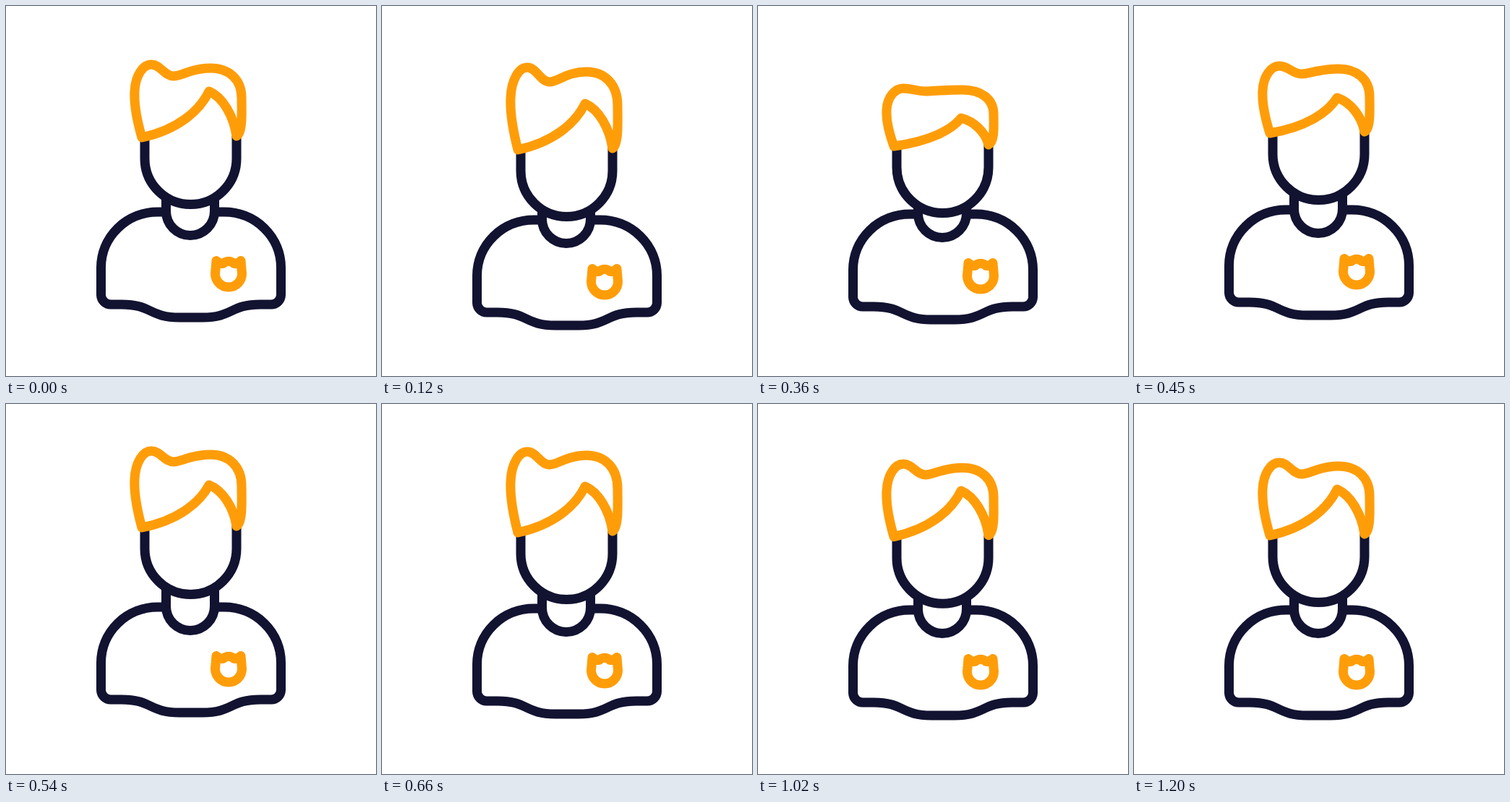
These frames come from a looping animation (512 by 512 pixels, 3800 ms). An HTML page:

```html
<!DOCTYPE html>
<html>
<head>
<meta charset="utf-8">
<style>
  html, body { margin: 0; height: 100%; overflow: hidden; background: #fff; }
  svg { display: block; width: 100vw; height: 100vh; }
  path { fill: none; stroke: #121331; stroke-width: 13; stroke-linejoin: round; }
  .accent { stroke: #ff9d09; stroke-linecap: round; }
</style>
</head>
<body>
<svg viewBox="0 0 512 512">
  <path id="head"/>
  <path id="neck"/>
  <g id="torso">
    <path d="M221 285H210A78.5 77 0 0 0 131.5 362V400A13.5 13.5 0 0 0 145 413H160C202 413 198 431 240 431H272C314 431 310 413 352 413H367A13.5 13.5 0 0 0 380.5 400V362A78.5 77 0 0 0 302 285H289"/>
    <path class="accent" d="M291 352.5Q299 359 303 354.5Q308 352 313 354.5Q317 359 325 352.5L326.5 370.5A18.5 18.5 0 0 1 289.5 370.5Z"/>
  </g>
  <path id="hair" class="accent"/>
</svg>
<script>
const LOOP = 3800, STEP = 30, END = 1200;

// time, then vertical offsets: body, head, hair top, notch, right crown, fringe peak
const keys = [
  [0, 0, 0, 0, 0, 0, 0],
  [120, 11, 17, 4, 8, 5, 17],
  [210, 18, 34, 23, 26, 22, 35],
  [240, 19, 35, 31, 30, 29, 40],
  [300, 12, 26, 41, 32, 38, 45],
  [360, 3, 12, 33, 21, 30, 37],
  [450, -3, -6, 2, -3, 1, 9],
  [540, -4, -11, -16, -17, -16, -6],
  [600, -3.4, -9, -20, -18, -19, -8],
  [660, -2, -4, -15, -13, -15, -4],
  [750, -.5, 2, -4, -4, -4, 2],
  [840, 0, 5, 7, 3, 6, 7],
  [960, 0, 3, 4, 2, 4, 4],
  [1080, 0, .5, .5, 0, .5, .5],
  [END, 0, 0, 0, 0, 0, 0]
];

const el = id => document.getElementById(id);
const draw = (id, d) => el(id).setAttribute('d', d);

function slope(i, c) {
  const a = keys[i - 1], b = keys[i + 1];
  return a && b ? (b[c] - a[c]) / (b[0] - a[0]) : 0;
}

// Cubic Hermite through the keys
function sample(t) {
  let i = 0;
  while (i < keys.length - 2 && t >= keys[i + 1][0]) i++;
  const a = keys[i], b = keys[i + 1], span = b[0] - a[0];
  const u = (t - a[0]) / span, v = 1 - u;
  return a.slice(1).map((_, n) => {
    const c = n + 1;
    return v * v * (1 + 2 * u) * a[c] + u * u * (3 - 2 * u) * b[c]
      + span * u * v * (v * slope(i, c) - u * slope(i + 1, c));
  });
}

function render(t) {
  const [body, head, dTop, dNotch, dCrown, dPeak] = sample(t);
  const left = 182 + head, right = 180 + head;
  const top = 81 + dTop, notch = 97 + dNotch, crown = 86 + dCrown, peak = 118 + dPeak;
  const mix = (from, to, k) => from + (to - from) * k;

  el('torso').setAttribute('transform', `translate(0 ${body})`);
  draw('head', `M192 ${left}V${211 + head}A63.5 63.5 0 0 0 319 ${211 + head}V${right}`);
  draw('neck', `M221.5 ${265 + head}V${284 + body}A33.5 33.5 0 0 0 288.5 ${284 + body}V${265 + head}`);
  draw('hair', `M188 ${left}
    C181 ${mix(left, top, .24)} 177 ${mix(left, top, .44)} 178 ${mix(left, top, .63)}
    C179 ${mix(left, top, .86)} 190 ${top} 201 ${top}
    C214 ${top} 219 ${notch} 232 ${notch}
    C243 ${notch} 256 ${crown} 283 ${crown}
    C308 ${crown} 326 ${mix(right, crown, .84)} 326 ${mix(right, crown, .56)}
    C326 ${mix(right, crown, .37)} 328 ${mix(right, crown, .05)} 319 ${right}
    C315 ${mix(right, peak, .45)} 300 ${mix(right, peak, .87)} 281 ${peak}
    C268 ${mix(left, peak, .58)} 238 ${mix(left, peak, .17)} 188 ${left}Z`);
}

function tick() {
  const t = performance.now() % LOOP;
  render(Math.min(END, Math.floor(t / STEP) * STEP));
  requestAnimationFrame(tick);
}
tick();
</script>
</body>
</html>
```
